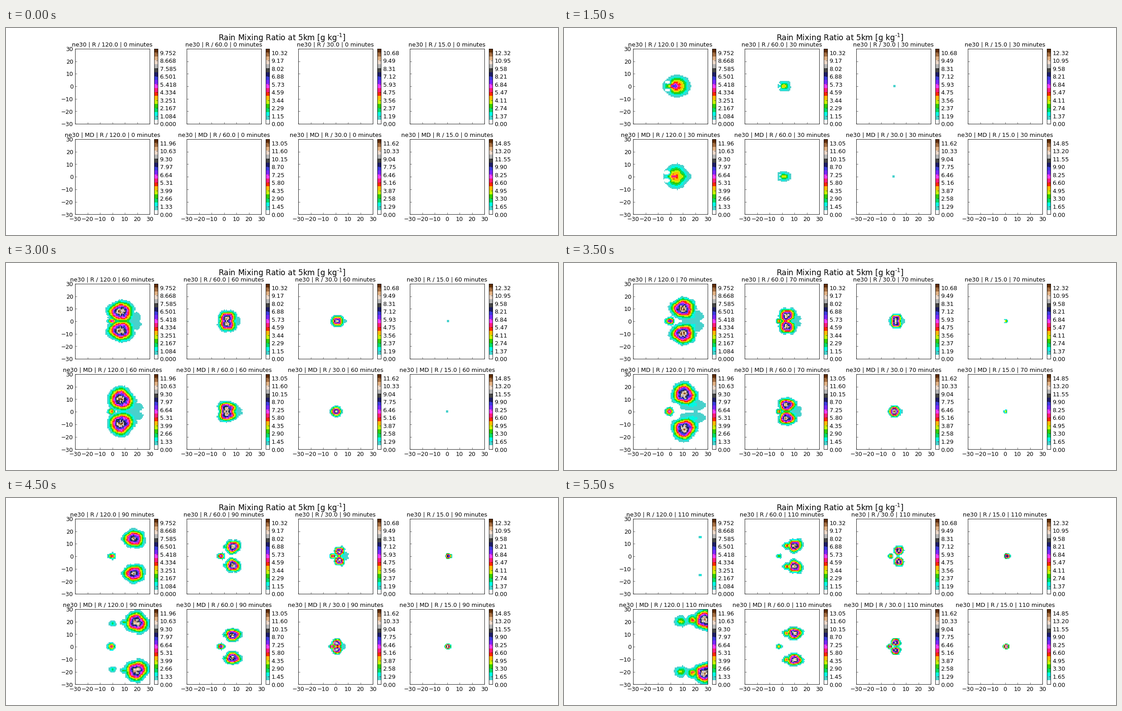
A matplotlib script for the animation above (6000 ms loop, 1222 by 458 pixels).

```python
import numpy as np
import matplotlib.pyplot as plt
from matplotlib.animation import FuncAnimation
from matplotlib.colors import ListedColormap

plt.rcParams.update({"font.family": "DejaVu Sans", "font.size": 12,
                     "mathtext.fontset": "dejavusans",
                     "text.kerning_factor": 6})

WIDTH, HEIGHT = 1222, 458
CELLS = 72
COLORS = ["#ffffff", "#48d1cc", "#00f8e4", "#00dc64", "#32cd00", "#c8f000",
          "#ffb900", "#ff2800", "#ff1e78", "#f03cff", "#7828ff", "#3c3cdc",
          "#1e1e64", "#464646", "#b4b4b4", "#ebd7c8", "#deaf82", "#a56e41",
          "#5f2d05"]
LEVELS = len(COLORS)
CMAP = ListedColormap(COLORS)

fig = plt.figure(figsize=(16, 6), dpi=76.375, facecolor="white")
centers = (np.arange(CELLS) + 0.5) * 60 / CELLS - 30
X, Y = np.meshgrid(centers, centers)


def axes_at(left, top, width, height):
    return fig.add_axes([left / WIDTH, 1 - (top + height) / HEIGHT,
                         width / WIDTH, height / HEIGHT])


def show_grid(ax, data, extent):
    return ax.imshow(data, cmap=CMAP, vmin=0, vmax=LEVELS, extent=extent,
                     origin="lower", aspect="auto", interpolation="nearest")


def ramp(t, start, end):
    return float(np.clip((t - start) / (end - start), 0, 1))


def ease_out(u):
    return 1 - (1 - u) ** 2


class Storm:
    """A storm that grows, splits into two mirrored lobes and drifts east."""

    def __init__(self, seed, onset, size, x0, drift, split=120, spread=0,
                 ripen=36, trail=0, end=200):
        self.onset, self.size, self.x0, self.drift = onset, size, x0, drift
        self.split, self.spread, self.ripen = split, spread, ripen
        self.trail, self.end = trail, end
        rng = np.random.default_rng(seed)
        self.phases = rng.uniform(0, 2 * np.pi, 3)
        noise = rng.normal(size=X.shape)
        noise = noise + 0.8 * noise[::-1]
        noise = noise + 0.5 * sum(np.roll(noise, s, a)
                                  for s in (1, -1) for a in (0, 1))
        self.noise = np.clip(noise / noise.std(), -2, 2)

    def cells(self, t):
        """Yield x, y, west, east, half height and peak level of each cell."""
        growth = ease_out(ramp(t, self.onset, self.onset + 32))
        fade = ramp(t, self.end, self.end - 25)
        if growth == 0:
            return
        apart = ease_out(ramp(t, self.split, 110))
        travel = (t - 50) / 60
        x = self.x0 + self.drift * max(travel, -travel / 4)
        y = self.spread * apart
        r = max(0.9, self.size * growth * (1 - 0.2 * apart) * fade)
        peak = 1.5 + 15.5 * ramp(t, self.onset, self.onset + self.ripen) * fade
        yield x, y, 0.95 * r, 1.15 * r, 0.92 * r, peak

        if t < self.split + 8:
            yield self.x0, 0, 0.45 * r, 0.6 * r, 0.22 * r, peak + 3 * growth

        # weak rain ahead of the parting lobes
        if self.split <= t <= self.split + 35:
            s = self.size
            yield x + 0.5 * s, 0.4 * y, 0.8 * s, 0.95 * s, 0.4 * s, 2.6

        # cell left behind on the axis
        rear = 1 - ((t - self.split - 35) / 32) ** 2
        if rear > 0 and self.spread:
            r_rear = self.size ** 0.5 * (0.5 + 0.6 * rear) * fade
            yield (self.x0 - 2.7, 0, 1.2 * r_rear, r_rear, r_rear,
                   12 * rear * fade)

        for i in range(1, self.trail + 1):
            age = ramp(t, 70, 105)
            r_trail = 0.45 * self.size * age
            yield (x - 0.75 * self.size * i, y + 1 - i, r_trail, r_trail,
                   0.8 * r_trail, (10 - 2 * i) * age)

        # dry notch on the upwind side of the young storm
        if t < self.onset + 25:
            yield (self.x0 - 0.4 * r, 0.28 * r, 0.3 * r, 0.3 * r, 0.22 * r,
                   -6 * growth)

    def field(self, t):
        level = np.zeros_like(X)
        a, b, c = self.phases
        for x, y, west, east, half, peak in self.cells(t):
            if 0 <= peak < 1:
                continue
            for side in (1, -1):
                dx, dy = X - x, side * Y - y
                angle = np.arctan2(dy if y else np.abs(dy), dx)
                wobble = (1 + 0.05 * np.cos(2 * angle + a)
                          + 0.06 * np.cos(3 * angle + b)
                          + 0.03 * np.cos(5 * angle + c))
                r = np.hypot(dx / np.where(dx < 0, west, east), dy / half)
                u = np.clip(1 - r * wobble * (1 + 0.03 * self.noise), 0, 1)
                u = 0.5 * u + 0.5 * u * u * (3 - 2 * u)
                if peak < 0:
                    level += peak * u
                else:
                    level = np.maximum(level, (u > 0) * (1 + (peak - 1) * u))
        rough = 1 + (level - 1) * (1 + 0.1 * self.noise)
        return np.where(level >= 1, np.clip(rough, 0, LEVELS - 0.01), 0)


class Panel:
    def __init__(self, col, row, name, top_label, digits, storm):
        self.name, self.storm = name, storm
        left, top = 153 + 247 * col, 46 + 200 * row

        ax = axes_at(left, top, 165, 166.3)
        self.image = show_grid(ax, np.zeros_like(X), (-30, 30, -30, 30))
        ticks = np.arange(-30, 31, 10)
        ax.set_xticks(ticks)
        ax.set_yticks(ticks)
        ax.tick_params(direction="in", length=4, width=0.5, pad=4,
                       labelbottom=row == 1, labelleft=col == 0)
        self.title = ax.set_title("", fontsize=12, pad=5)

        bar = axes_at(left + 175, top, 8.3, 166.3)
        show_grid(bar, np.arange(LEVELS)[:, None] + 0.5, (0, 1, 0, LEVELS))
        bar.set_xticks([])
        bar.yaxis.tick_right()
        bar.set_yticks(range(0, LEVELS, 2),
                       [f"{top_label * i / 9:.{digits}f}" for i in range(10)])
        bar.tick_params(direction="in", length=4, width=0.5, pad=4)

    def draw(self, minute):
        self.image.set_data(self.storm.field(minute))
        self.title.set_text(f"ne30 | {self.name} | {minute} minutes")


PANELS = [
    Panel(0, 0, "R / 120.0", 9.752, 3,
          Storm(1, onset=10, size=12, x0=2.5, drift=21, split=40, spread=15,
                end=113)),
    Panel(1, 0, "R / 60.0", 10.317, 2,
          Storm(2, onset=18, size=8, x0=0.5, drift=9.5, split=52, spread=8.3,
                trail=1)),
    Panel(2, 0, "R / 30.0", 10.68, 2,
          Storm(3, onset=28, size=5.5, x0=0.5, drift=3.5, split=60,
                spread=4.4)),
    Panel(3, 0, "R / 15.0", 12.316, 2,
          Storm(4, onset=58, size=3.5, x0=0.4, drift=1)),
    Panel(0, 1, "MD | R / 120.0", 11.956, 2,
          Storm(5, onset=10, size=12.5, x0=2, drift=25, split=42, spread=21,
                ripen=46, trail=2)),
    Panel(1, 1, "MD | R / 60.0", 13.05, 2,
          Storm(6, onset=18, size=8, x0=0.5, drift=9.3, split=54, spread=10.5,
                ripen=42, trail=1)),
    Panel(2, 1, "MD | R / 30.0", 11.62, 2,
          Storm(7, onset=28, size=5.2, x0=0, drift=1.5, split=66,
                spread=3.4)),
    Panel(3, 1, "MD | R / 15.0", 14.85, 2,
          Storm(8, onset=58, size=3.6, x0=0, drift=0.6)),
]

fig.text(0.5, 1 - 28 / HEIGHT, "Rain Mixing Ratio at 5km [g kg$^{\u20101}$]",
         fontsize=16, ha="center", va="baseline")


def update(step):
    for panel in PANELS:
        panel.draw(10 * step)
    return []


anim = FuncAnimation(fig, update, frames=12, interval=500, repeat=True,
                     repeat_delay=0, blit=False)
plt.show()
```
